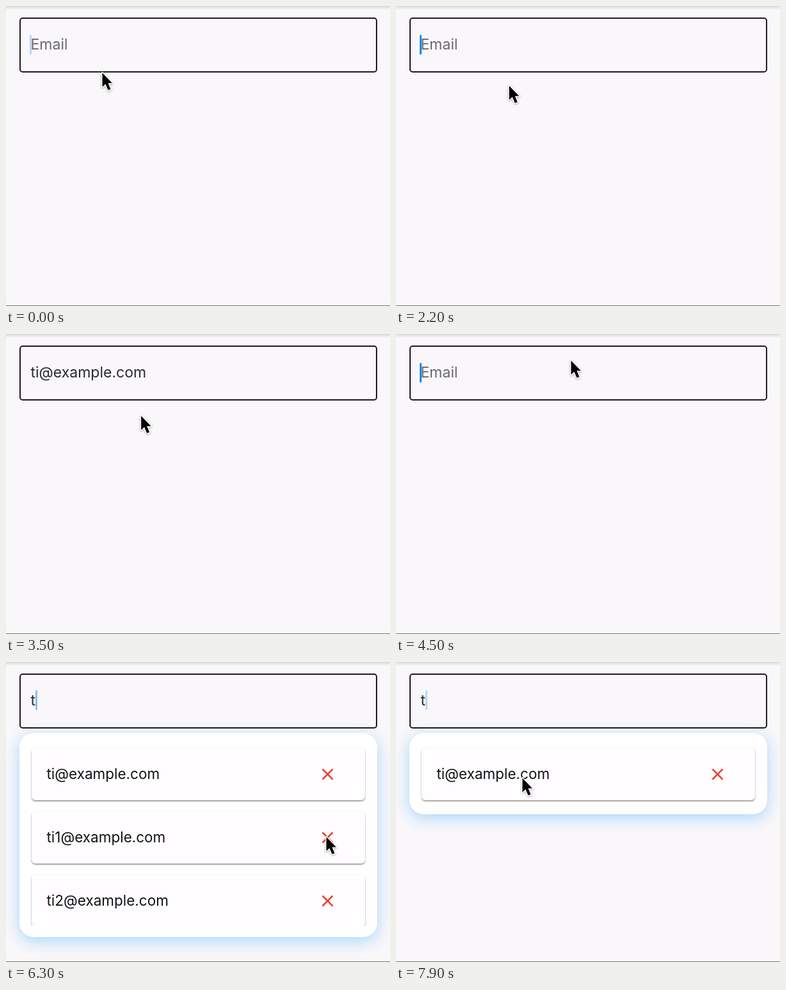
Animation, 600 px wide and 469 px high, one loop 8 s. Source, as an HTML page:

```html
<!DOCTYPE html>
<html lang="en">
<head>
<meta charset="utf-8">
<style>
  html, body { margin: 0; width: 100%; height: 100%; overflow: hidden; background: #f9f7fa; }
  #stage { position: relative; width: 600px; height: 469px; overflow: hidden;
    font: 22.5px/28px Inter, Roboto, sans-serif; color: #121214; }
  #stage div, svg { position: absolute; box-sizing: border-box; white-space: nowrap; }
  #top { width: 600px; height: 6px; background: linear-gradient(#d9d7da, #f9f7fa); }
  #bottom { top: 468px; width: 600px; height: 1px; background: #77767a; }
  #field { left: 21px; top: 18px; width: 559px; height: 86px; border: 2px solid #1c1b1d; border-radius: 5px; }
  #text { left: 38.5px; top: 46px; font-size: 23px; }
  #caret { width: 3px; height: 31px; border-radius: 1.5px; background: #1e88e5; }
  #popup { left: 21px; top: 111px; width: 559px; border-radius: 22px; background: #fff;
    box-shadow: 0 6px 23px #a9d6fa; }
  #list { left: 8px; right: 8px; top: 10px; bottom: 18px; overflow: hidden; }
  .card { left: 11px; width: 521px; height: 82px; border-radius: 6px; background: #fffdff;
    box-shadow: 0 2px 2px #0004, 0 1px 3px #0003; }
  .card div { left: 23.5px; top: 27px; }
  .card svg { left: 453px; top: 32px; }
  #cursor { left: -4px; top: -4px; filter: drop-shadow(0 1px 1.5px #0005); }
</style>
</head>
<body>
<div id="stage">
  <div id="top"></div>
  <div id="bottom"></div>
  <div id="popup"><div id="list"></div></div>
  <div id="field"></div>
  <div id="text"></div>
  <div id="caret"></div>
  <svg id="cursor" width="26" height="38" viewBox="-4 -4 26 38">
    <path d="M0 0V22L5 17.5L9 27L13 25.5L9 16H15.5Z" stroke="#fff" stroke-width="3" paint-order="stroke" stroke-linejoin="round"/>
  </svg>
</div>
<script>
const LOOP = 8000;
const $ = id => document.getElementById(id);
const emails = ['ti@example.com', 'ti1@example.com', 'ti2@example.com'];

const cards = emails.map(email => {
  const card = document.createElement('div');
  card.className = 'card';
  card.innerHTML = `<div>${email}</div><svg width="19" height="19">
    <path d="M1.5 1.5L17.5 17.5M17.5 1.5L1.5 17.5" stroke="#e94335" stroke-width="2.6"/></svg>`;
  $('list').append(card);
  return card;
});

const clamp = v => Math.min(1, Math.max(0, v));
const ease = v => v * v * (3 - 2 * v);
const ramp = (t, from, to) => ease(clamp((t - from) / (to - from)));

// Field states: start time, content, blink start (null = unfocused)
const states = [
  [0, '', -700],
  [870, 't', 870],
  [1970, '', 1970],
  [2330, 't', 2330],
  [2800, emails[0], null],
  [4300, '', 4380],
  [5180, 't', 5200],
];

// Pointer stops: time, x, y
const stops = [
  [0, 150, 103], [100, 150, 103], [600, 144, 85], [1350, 144, 85], [1600, 170, 99],
  [1900, 170, 99], [2600, 186, 160], [3350, 186, 160], [3800, 280, 32], [4100, 273, 40],
  [5450, 273, 40], [6150, 500, 272], [7620, 500, 272], [7880, 197, 180], [LOOP, 197, 180],
];

function pointer(t) {
  const i = stops.findIndex(s => s[0] > t);
  const [a, x, y] = stops[i - 1], [b, u, v] = stops[i];
  const k = ramp(t, a, b);
  return [x + (u - x) * k, y + (v - y) * k];
}

function blink(t, since) {
  if (since === null) return 0;
  if (t < since + 500 && since > 0) return 1;
  const p = (t - since) % 1000;
  return p < 500 ? clamp(p / 200) : clamp(1 - (p - 500) / 280);
}

function draw(t) {
  const [, value, since] = states.findLast(s => s[0] <= t);
  $('text').textContent = value || 'Email';
  $('text').style.color = value ? '#2b2a2d' : '#6b6a6e';
  $('caret').style.left = (value ? 45.5 : 37) + 'px';
  $('caret').style.top = (value ? 44 : 45) + 'px';
  $('caret').style.opacity = blink(t, since);

  $('popup').style.opacity = ramp(t, 860, 1030) - ramp(t, 1970, 2120)
    + ramp(t, 2340, 2530) - ramp(t, 2800, 3150) + ramp(t, 5190, 5390);
  const first = ramp(t, 6380, 6600), second = ramp(t, 7300, 7540);
  $('popup').style.height = 319 - 94.5 * first - 97.5 * second + 'px';

  const visible = [true, first === 0, second === 0];
  let row = 0;
  cards.forEach((card, i) => {
    card.style.display = visible[i] ? '' : 'none';
    if (visible[i]) card.style.top = 13 + 99 * row++ + 'px';
  });

  const [x, y] = pointer(t);
  $('cursor').style.transform = `translate(${x + 0.5}px, ${y + 1.5}px)`;
}

const start = performance.now();
function tick() {
  draw((performance.now() - start) % LOOP);
  requestAnimationFrame(tick);
}
tick();
</script>
</body>
</html>
```
